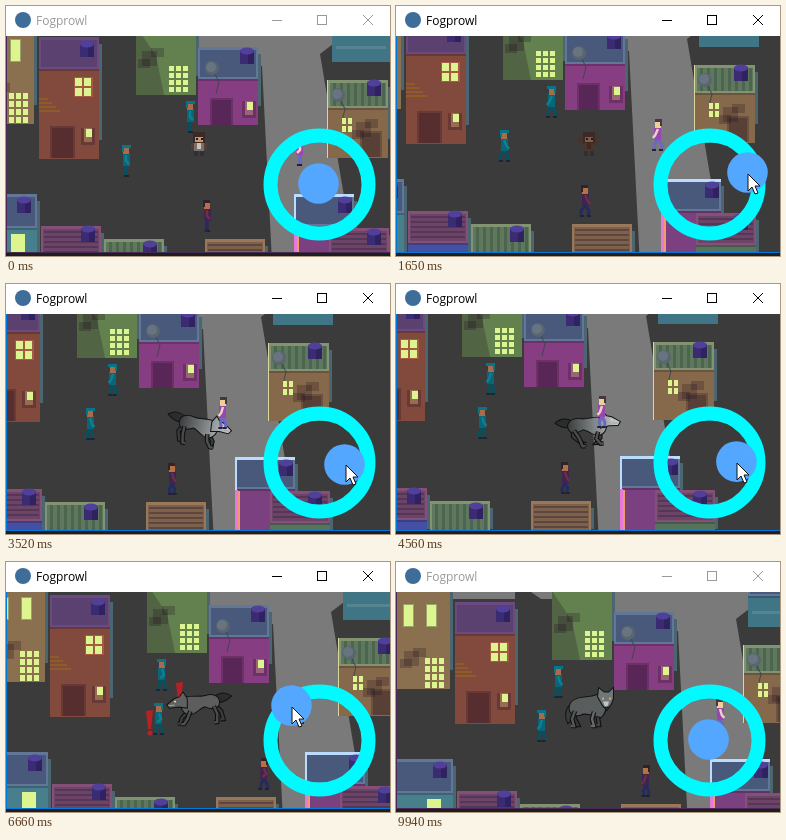
These frames come from a looping animation (384x250 px, 10 s). An HTML page with a canvas:

```html
<!DOCTYPE html>
<html lang="en">
<head>
<meta charset="utf-8">
<title>Fogprowl</title>
<style>
html, body { margin: 0; width: 100%; height: 100%; overflow: hidden; background: #1e1e1e; }
#stage { position: relative; width: 384px; height: 250px; overflow: hidden; }
canvas { position: absolute; left: 0; top: 0; }
#name { position: absolute; left: 30px; top: 6px; font: 12px/17px "Open Sans", sans-serif; }
</style>
</head>
<body>
<div id="stage">
  <canvas id="view" width="384" height="250"></canvas>
  <span id="name">Fogprowl</span>
</div>
<script>
const LOOP = 10;
const LIT = '#dcf58e', SHADE = 'rgba(25,12,30,.24)';
const HERO = { x: 193, y: 146 }, HOME = { x: 312.5, y: 177.5 };
const g = document.getElementById('view').getContext('2d');
const label = document.getElementById('name');

// key points: seconds, x, y
const camera = [[.5, 0, 0], [1.5, -23, -15], [2.3, -23, -15], [3.8, -67, -15],
  [4.5, -67, -16], [5.55, -12, -17], [6.66, 11, 2], [8, 26, 9]];
const stick = [[.5, 0, 0], [.7, 26, 26], [1.65, 39, -11], [3.52, 26, 3], [4.6, 28, 0],
  [5.55, -63, -20], [6.66, -27, -34], [7.82, -31, -4], [8.4, 0, 0]];

function follow(keys, t) {
  let [, x, y] = keys[0];
  for (let i = 1; i < keys.length; i++) {
    const [t0, x0, y0] = keys[i - 1], [t1, x1, y1] = keys[i];
    const f = Math.min(1, Math.max(0, (t - t0) / (t1 - t0)));
    x += (x1 - x0) * f;
    y += (y1 - y0) * f;
  }
  return { x, y };
}

// townsfolk pace at an even speed and turn back after each leg
const LEG = 8.55;
function pace(w, t) {
  const d = Math.abs(t - w.turn);
  return w.x + w.speed * (LEG - Math.abs(LEG - d));
}
const police = { shirt: '#096577', sleeve: '#0b8191', legs: '#08505f', skin: '#a86c4d', hair: '#087488', cap: true };
const cop1 = { x: 129, y: 111, turn: 8.95, speed: 6.8, ...police };
const cop2 = { x: 153, y: 155, turn: 4.96, speed: -6.7, ...police };
const man = { x: 247, y: 210, turn: 6.6, speed: -7,
  shirt: '#3f2450', sleeve: '#6b2f48', legs: '#252b60', skin: '#b87040', hair: '#33202d' };
const lady = { x: 270, y: 144, turn: 4.6, speed: 5.2,
  shirt: '#9a45b0', sleeve: '#ead2c4', legs: '#6b68c4', skin: '#ecd09a', hair: '#4a3440' };

function box(x, y, w, h, c) { g.fillStyle = c; g.fillRect(x, y, w, h); }
function oval(x, y, rx, ry, c) {
  g.fillStyle = c; g.beginPath(); g.ellipse(x, y, rx, ry, 0, 0, 7); g.fill();
}
function disc(x, y, r, c) { oval(x, y, r, r, c); }
function trace(p) {
  g.beginPath();
  for (let i = 0; i < p.length; i += 2) g.lineTo(p[i], p[i + 1]);
}
function shape(c, ...p) { g.fillStyle = c; trace(p); g.fill(); }
function line(c, w, ...p) { g.strokeStyle = c; g.lineWidth = w; trace(p); g.stroke(); }
function placed(x, y, flip, draw) {
  g.save(); g.translate(Math.round(x), Math.round(y)); g.scale(flip, 1); draw(); g.restore();
}

const slate = { roof: '#48597b', rim: '#627698' };
const violet = { roof: '#5a4170', rim: '#6b4a82' };
const moss = { roof: '#5f785d', rim: '#829371', stripe: '#4b654f', upright: true };
const plum = { roof: '#6b4468', rim: '#845078', stripe: '#553657' };
const rust = { roof: '#7d614c', rim: '#98775a', stripe: '#5c463d' };

function house(x, top, eave, end, wall, r) {
  box(x + 60, top + 7, 3, Math.max(8, end - top - 26), '#4b6571');
  box(x, eave, 60, end - eave, wall);
  box(x, top, 60, eave - top, r.rim);
  box(x + 2, top + 3, 56, eave - top - 5, r.roof);
  if (r.stripe && r.upright) for (let i = 5; i < 57; i += 7) box(x + i, top + 3, 3, eave - top - 5, r.stripe);
  else if (r.stripe) for (let y = top + 5; y < eave - 3; y += 5) box(x + 3, y, 54, 2, r.stripe);
  box(x, eave, 60, 2, SHADE);
}
function tank(x, y) {
  box(x, y + 3, 14, 14, '#3b2b72');
  box(x + 8, y + 3, 6, 14, '#302160');
  oval(x + 7, y + 4, 7, 3.5, '#51409a');
}
function dish(x, y) {
  line('#3d4650', 1, x, y, x + 7, y + 14, x + 4, y + 26);
  disc(x, y, 7, '#59656f'); disc(x - 1, y - 1, 5, '#687580');
}
function panes(x, y, cols, rows, dx, dy) {
  for (let r = 0; r < rows; r++)
    for (let c = 0; c < cols; c++) box(x + c * dx, y + r * dy, dx - 2, dy - 2, LIT);
}
function door(x, y, w, h) {
  box(x - 2, y - 2, w + 4, h + 2, SHADE); box(x, y, w, h, SHADE);
}
function porch(x, y) {
  box(x - 3, y, 14, 17, SHADE);
  box(x, y, 8, 14, 'rgba(255,220,150,.3)'); box(x + 2, y + 1, 6, 8, LIT);
}
function crates(x, y) {
  box(x, y, 15, 15, SHADE); box(x - 4, y + 8, 12, 9, SHADE); box(x + 9, y - 3, 13, 9, SHADE);
}

function town() {
  box(-80, -20, 580, 320, '#3b3b3b');
  box(-80, -20, 580, 48, '#7a7a7a');
  shape('#7a7a7a', 193, 10, 340, 10, 340, 28, 314, 48, 338, 190, 344, 275, 267, 275, 256, 60, 193, 50);
  shape('#3b3b3b', 93, 10, 122, 30, 93, 60);

  house(-32, -30, -5, 118, '#8a704f', violet);
  for (const x of [-18, 5]) { box(x - 1, 33, 11, 23, '#9ba36b'); box(x, 34, 9, 21, LIT); }
  crates(-18, 80);
  panes(3, 87, 3, 4, 7, 8);

  house(33, 31, 63, 153, '#824a3d', violet);
  tank(74, 34);
  for (let i = 0; i < 4; i++) box(33, 92 + i * 4, 9 + i * 4, 2, '#8d5c28');
  box(68, 71, 19, 20, '#a45b42'); panes(69, 72, 2, 2, 9, 10);
  door(46, 122, 21, 30); porch(78, 122);

  house(130, -30, -5, 89, '#63804f', moss);
  shape(SHADE, 130, 20, 150, 50, 158, 89, 130, 89);
  crates(136, 45);
  panes(163, 60, 3, 4, 7, 7);

  house(192, 41, 73, 119, '#873d81', slate);
  tank(234, 41); dish(206, 62);
  door(206, 94, 19, 25); porch(239, 95);

  house(326, -30, 25, 56, '#3f7585', slate);
  box(330, 40, 50, 3, '#568591');

  house(322, 74, 102, 152, '#86694a', moss);
  box(321, 74, 1, 78, '#d8d7a0');
  tank(361, 73); dish(332, 89);
  panes(336, 112, 2, 2, 6, 8);
  crates(350, 116); door(356, 127, 18, 24);

  house(-29, 188, 222, 280, '#487f8d', slate);
  tank(11, 190); panes(5, 228, 1, 1, 16, 20);
  house(288, 188, 220, 280, '#7a407f', slate);
  box(288, 188, 60, 3, '#b9dcff'); box(288, 188, 2, 33, '#b9dcff');
  box(288, 221, 3, 60, '#e878da'); box(291, 222, 2, 50, '#f19a6a');
  tank(332, 190);
  house(35, 220, 252, 280, '#4550a5', plum);
  tank(75, 219);
  house(98, 233, 264, 280, '#67815a', moss);
  tank(137, 234);
  house(199, 233, 264, 280, '#7c5a43', rust);
  house(323, 222, 254, 280, '#55745b', plum);
  tank(361, 222);
}

function person(w, t) {
  const x = pace(w, t), s = Math.sin(t * 10.5) * 4;
  placed(x, w.y, pace(w, t + .01) > x ? 1 : -1, () => {
    line(w.legs, 3, 0, 4, -s, 10, -s - 1, 15);
    line(w.legs, 3, 0, 4, s, 10, s, 15);
    box(s - 1, 14, 4, 2, '#202331');
    box(-s - 2, 14, 4, 2, '#202331');
    box(-3, -8, 7, 13, w.shirt);
    line(w.sleeve, 2.5, 0, -6, -s * .7, 0, 3 - s * .5, 3);
    box(-3, -14, 6, 7, w.skin);
    box(-4, -16, w.cap ? 9 : 7, 3, w.hair);
    box(-4, -14, 2, 5, w.hair);
  });
}
function alarm(w, dx, dy, t, end) {
  if (t < 4.95 || t > end) return;
  placed(pace(w, t) + dx, w.y + dy, 1, () => {
    shape('#b92025', -4, -12, 3, -13, 1, 6, -2, 6);
    disc(0, 10, 2.6, '#b92025');
  });
}

function human(t) {
  const wild = t > 1.3, s = wild || t < .5 ? 0 : Math.sin(t * 12) * 2;
  g.translate(0, -8);
  box(-5, 5, 4, 7 + s, '#302d35'); box(1, 5, 4, 7 - s, '#302d35');
  box(-5, -2, 10, 9, wild ? '#4c342b' : '#77706d');
  box(-2, -2, 4, 7, wild ? '#3c2922' : '#d0c2b4');
  for (const k of [-1, 1])
    if (wild) line('#49342b', 4, 4 * k, 0, 8 * k, -3, 6 * k, -9);
    else line('#533d36', 3, 6.5 * k, -1, 6.5 * k, 6);
  box(-6, -12, 12, 11, '#3b2923');
  box(-4, -7, 8, 5, wild ? '#835c47' : '#c99675');
  box(-3, -6, 2, 2, '#211b1b'); box(2, -6, 2, 2, '#211b1b');
}

function part(d, c) {
  const p = new Path2D(d);
  g.strokeStyle = '#111'; g.lineWidth = 2; g.stroke(p);
  g.fillStyle = c; g.fill(p);
}
function leg(x, y, kx, ky, fx, fy, c) {
  line('#111', 4.6, x, y, kx, ky, fx, fy, fx - 3, fy);
  line(c, 2.4, x, y, kx, ky, fx, fy, fx - 3, fy);
}
// faces left
function runner(t, pale) {
  const turn = (t - 5.535) / .386 * 2 * Math.PI, s = Math.cos(turn);
  let coat = '#5c5e5e';
  if (pale) {
    coat = g.createLinearGradient(-30, 0, 20, 0);
    coat.addColorStop(0, '#c8cdd2'); coat.addColorStop(.4, '#8c9194'); coat.addColorStop(1, '#3d4041');
  }
  g.rotate(Math.sin(turn) * .25);
  part('M16-9C22-12 27-13 33-8C28-4 22-3 17-4Z', '#2b2d2d');
  leg(-11, 2, -15 - s * 4, 8, -14 - s * 7, 13, '#3a3c3c');
  leg(16, -1, 19 + s * 3, 6, 15 + s * 9, 14, '#3a3c3c');
  part('M-16-11C-8-14 0-10 8-11C16-13 23-8 20-1C17 4 11 2 6-1C0 0-4 6-11 5C-17 3-19-5-16-11Z', coat);
  leg(-9, 2, -10 - s * 3, 9, -14 - s * 3, 14, '#505252');
  leg(15, 0, 14 + s * 4, 8, 12 + s * 5, 16, '#4a4c4c');
  part('M-11-11L-14-17L-18-13L-23-12L-31-7L-29-4L-20-4L-12-2Z', pale ? coat : '#606262');
  box(-24, -10, 2, 1.5, '#eadb9b');
  line('#a3a5a5', 1, -30, -6, -24, -6);
}
function idle(t) {
  part('M-17-4C-24 0-24 9-21 15C-18 13-17 6-13 0Z', '#383a3b');
  leg(-11, 3, -15, 9, -11, 17, '#333636');
  leg(9, 3, 9, 10, 10, 17, '#3e4243');
  part('M-18-5C-12-13 2-9 10-14C20-12 18 4 12 9C4 8-3 3-9 7C-17 8-22 3-18-5Z', '#595d5e');
  leg(-14, 3, -17, 11, -15, 18, '#555859');
  leg(5, 4, 3, 11, 5, 18, '#666b6c');
  g.translate(0, Math.sin(t * 3.3) * .6);
  part('M9-12L10-20L15-16L20-16L24-20L24-10L22-5L18 1L14-3Z', '#70777a');
  shape('#c1c6c7', 14, -7, 20, -7, 18, -1, 16, -2);
  box(13, -11, 2, 2, '#d6b44a'); box(20, -11, 2, 2, '#d6b44a');
  box(16, -2, 4, 2, '#171717');
}
function player(t) {
  const right = t > 2.05 && t < 4.75;
  placed(HERO.x, HERO.y, right ? -1 : 1, () => {
    if (t < 2.05) human(t);
    else if (t < 8.4) runner(t, right);
    else idle(t);
  });
}

function controls(t) {
  g.strokeStyle = '#00faff'; g.lineWidth = 14;
  g.beginPath(); g.arc(313.5, 178.5, 49, 0, 7); g.stroke();
  const s = follow(stick, t), x = HOME.x + s.x, y = HOME.y + s.y;
  disc(x, y, 20.3, '#53a7ff');
  if (t < .4 || t > 9.7) return;
  placed(x + 1, y + 1, 1, () => {
    const p = new Path2D('M0 0V17L4 13L7 20L10 19L7 12H12Z');
    g.fillStyle = '#fff'; g.fill(p);
    g.strokeStyle = '#111'; g.lineWidth = 1; g.stroke(p);
  });
}
function chrome(active) {
  const ink = active ? '#000' : '#999', edge = active ? '#0078d7' : '#4c2856';
  box(0, 0, 384, 30, '#fff');
  box(0, 30, 1, 217, edge); box(0, 246, 384, 1, edge);
  disc(17, 14, 8, '#3d6d98');
  box(266, 14, 10, 1, ink);
  g.strokeStyle = ink; g.lineWidth = 1; g.strokeRect(311.5, 9.5, 9, 9);
  line(ink, 1, 357, 9, 367, 19); line(ink, 1, 367, 9, 357, 19);
  label.style.color = ink;
}

function inTown(view, draw) { placed(view.x, view.y, 1, draw); }
function paint(t) {
  const view = follow(camera, t);
  g.clearRect(0, 0, 384, 250);
  g.save();
  g.beginPath(); g.rect(1, 30, 383, 216); g.clip();
  inTown(view, () => {
    town();
    for (const w of [cop1, cop2, man]) person(w, t);
    alarm(cop1, 18, 20, t, 7.25);
    alarm(cop2, -9, 4, t, 8.5);
  });
  player(t);
  inTown(view, () => person(lady, t));
  controls(t);
  g.restore();
  chrome(t >= .35 && t < 9.85);
}
const start = performance.now();
function tick() {
  paint((performance.now() - start) / 1000 % LOOP);
  requestAnimationFrame(tick);
}
tick();
</script>
</body>
</html>
```
